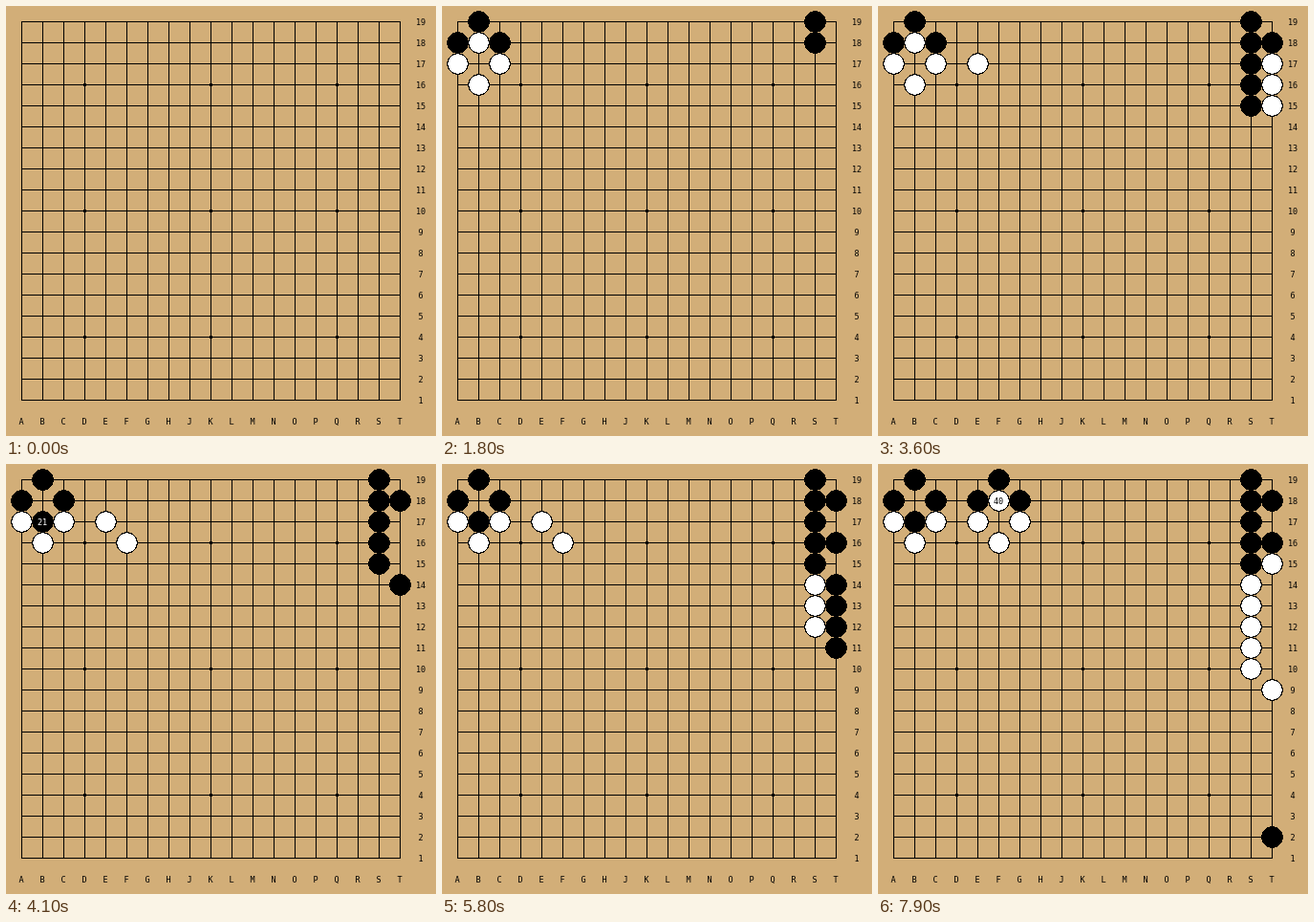
Animation of 450x450 px, one loop 8 s. Source, as an HTML page:

```html
<!DOCTYPE html>
<html lang="en">
<head>
<meta charset="utf-8">
<title>Go game replay</title>
<style>
  html, body { margin: 0; width: 100%; height: 100%; overflow: hidden; background: #d2ae78; }
  svg { display: block; width: 450px; height: 450px; shape-rendering: crispEdges; }
  text { font: 8.5px "DejaVu Sans Mono", monospace; text-anchor: middle; }
  .b { fill: #000; }
  .w { fill: #fff; stroke: #000; }
</style>
</head>
<body>
<svg viewBox="0 0 450 450">
  <rect width="450" height="450" fill="#d2ae78"/>
  <g id="board"></g>
  <g id="stones"></g>
</svg>
<script>
const SIZE = 19, CELL = 22, ORIGIN = 16, STEP = 100, LOOP = 8000;
const COLS = 'ABCDEFGHJKLMNOPQRST';
const MOVES = (
  'A18 A17 B19 C17 C18 B16 S19 B18 S18 T19 T18 T17 S17 T16 S16 T15 S15 E17 T14 F16 ' +
  'B17 T15 T16 S14 T13 S13 T12 S12 T11 S11 T10 S10 E18 T9 F19 T15 G18 G17 T2 F18'
).split(' ').map(m => [COLS.indexOf(m[0]), SIZE - m.slice(1)]);

const at = i => ORIGIN + CELL * i;
const key = (x, y) => y * SIZE + x;
const label = (x, y, s, fill = '#000') =>
  `<text x="${x}" y="${y + 3.1}" fill="${fill}">${s}</text>`;

function drawBoard() {
  const length = CELL * (SIZE - 1) + 1;
  let out = '';
  for (let i = 0; i < SIZE; i++) {
    const p = at(i);
    out += `<rect x="${p}" y="${ORIGIN}" width="1" height="${length}"/>`
      + `<rect x="${ORIGIN}" y="${p}" width="${length}" height="1"/>`
      + label(p, 435, COLS[i]) + label(434, p + .5, SIZE - i);
  }
  for (const x of [3, 9, 15])
    for (const y of [3, 9, 15])
      out += `<rect x="${at(x) - 1}" y="${at(y) - 1}" width="3" height="3"/>`;
  return out;
}

function neighbours(k) {
  const x = k % SIZE, y = Math.floor(k / SIZE);
  return [[x - 1, y], [x + 1, y], [x, y - 1], [x, y + 1]]
    .filter(([a, b]) => a >= 0 && b >= 0 && a < SIZE && b < SIZE)
    .map(([a, b]) => key(a, b));
}

// Remove the group containing k if it has no liberties.
function capture(stones, k) {
  const group = new Set([k]);
  for (const s of group)
    for (const n of neighbours(s)) {
      if (!stones.has(n)) return;
      if (stones.get(n) === stones.get(k)) group.add(n);
    }
  group.forEach(s => stones.delete(s));
}

// Positions after each move, starting with the empty board.
const positions = [new Map()];
MOVES.forEach(([x, y], i) => {
  const stones = new Map(positions[i]);
  const k = key(x, y), color = i % 2 ? 'w' : 'b';
  stones.set(k, color);
  for (const n of neighbours(k))
    if (stones.has(n) && stones.get(n) !== color) capture(stones, n);
  positions.push(stones);
});

function drawStones(step) {
  const played = Math.ceil(step / 2);
  let out = '';
  for (const [k, color] of positions[played]) {
    const x = at(k % SIZE) + .5, y = at(Math.floor(k / SIZE)) + .5;
    out += `<circle class="${color}" cx="${x}" cy="${y}" r="${color === 'b' ? 11.25 : 10.75}"/>`;
  }
  // The newest stone carries its number for one step.
  if (step % 2) {
    const [x, y] = MOVES[played - 1];
    out += label(at(x), at(y) + .5, played, played % 2 ? '#fff' : '#000');
  }
  return out;
}

document.getElementById('board').innerHTML = drawBoard();
const layer = document.getElementById('stones');
const start = performance.now();
let shown = -1;

function tick() {
  const time = Math.max(0, performance.now() - start) % LOOP;
  const step = Math.floor(time / STEP);
  if (step !== shown) {
    shown = step;
    layer.innerHTML = drawStones(step);
  }
  requestAnimationFrame(tick);
}
tick();
</script>
</body>
</html>
```
